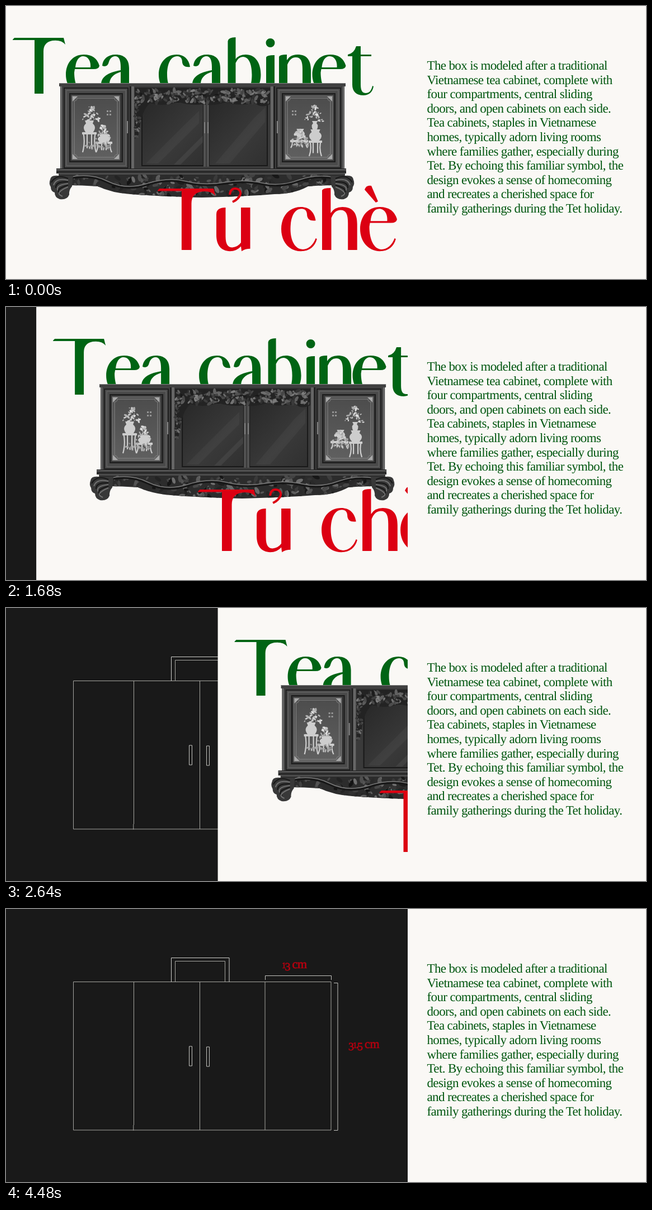
Recreate the animation shown at these times as an HTML page. Size 1144 by 489 pixels, loop 4560 ms.

```html
<!DOCTYPE html>
<html lang="en">
<head>
<meta charset="utf-8">
<title>Tea cabinet</title>
<style>
html, body { margin: 0; width: 100%; height: 100%; overflow: hidden; background: #faf8f5; }
svg { display: block; width: 100vw; height: 100vh; }
text { font-family: "Liberation Serif", "Times New Roman", serif; text-rendering: geometricPrecision; }
.copy { font-size: 23px; letter-spacing: -0.63px; fill: #00560f; }
.size { font-size: 22px; fill: #b4000f; stroke: #b4000f; stroke-width: .7; letter-spacing: -.3px; }
.plan { fill: none; stroke: #a5a5a0; stroke-width: 1; }
</style>
</head>
<body>
<svg id="stage" viewBox="0 0 1144 489" xmlns="http://www.w3.org/2000/svg"></svg>
<script>
const LOOP = 4560, STEP = 80;

// Display letters: baseline at 0, cap height 100
const stemArch = top => `M0,0V${top + 4}Q1,${top} 14,${top}V-60Q20,-70 33,-70C50,-70 57,-60 57,-42V0H42V-44C42,-58 39,-65 30,-65Q20,-65 15,-52V0Z`;
const glyphs = {
  T: "M0,-97L3,-100H91L94,-88Q87,-97 71,-95Q55,-92 55,-76V0H39V-96H0Z",
  e: "M60,-50Q54,-70 32,-70C12,-70 0,-54 0,-34C0,-14 13,2 32,2C46,2 55,-6 58,-18L56,-19C52,-8 44,-1 35,-1C22,-1 15,-18 15,-38L16,-44H50Q59,-44 60,-50ZM17,-47C18,-59 23,-67 31,-67C40,-67 45,-58 44,-47Z",
  a: "M50,0V-46C50,-62 41,-70 26,-70C12,-70 3,-62 2,-50Q10,-47 13,-54C15,-62 19,-67 25,-67C32,-67 35,-60 35,-48V-42C12,-38 0,-30 0,-16C0,-4 8,2 16,2C26,2 33,-4 35,-12V0ZM35,-39C22,-35 15,-28 15,-17C15,-8 19,-4 24,-4C31,-4 35,-12 35,-20Z",
  c: "M56,-48C54,-62 45,-70 32,-70C12,-70 0,-54 0,-34C0,-14 12,2 32,2C46,2 55,-6 58,-18L56,-19C52,-8 44,-1 35,-1C22,-1 15,-16 15,-34C15,-53 21,-67 33,-67C40,-67 42,-62 42,-56C43,-50 47,-47 56,-48Z",
  b: "M0,-94Q1,-101 14,-101V-62Q20,-70 32,-70C50,-70 59,-54 59,-34C59,-12 46,2 30,2Q14,2 0,0ZM14,-55Q19,-66 27,-66C38,-66 43,-52 43,-34C43,-14 37,-2 28,-2Q18,-2 14,-14Z",
  i: "M0,0V-65Q1,-69 15,-69V0ZM-.5,-91a8,8 0 1 0 16,0a8,8 0 1 0 -16,0Z",
  n: stemArch(-70),
  h: stemArch(-101),
  t: "M0,-70Q11,-72 15,-85H23V-70H42V-67H23V-16C23,-4 27,-1 32,-1C38,-1 42,-5 44,-14L46,-13C44,-2 37,3 28,3C15,3 8,-4 8,-16V-67H0Z",
  u: "M0,-58Q0,-69 15,-69V-22C15,-9 19,-4 26,-4Q35,-5 40,-12V-69H55V-2Q47,-2 41,2L40,-6Q33,2 22,2C8,2 0,-8 0,-24Z"
};

const word = (letters, y, scale, color, label) =>
  `<g fill="${color}" fill-rule="evenodd" role="img" aria-label="${label}">` +
  letters.map(([ch, x]) => `<path transform="translate(${x} ${y}) scale(${scale})" d="${glyphs[ch]}"/>`).join("") + "</g>";

const rect = (x, y, w, h, fill, more = "") => `<rect x="${x}" y="${y}" width="${w}" height="${h}" fill="${fill}" ${more}/>`;
const path = (d, fill, more = "") => `<path d="${d}" fill="${fill}" ${more}/>`;
const line = (d, color, width = 1) => path(d, "none", `stroke="${color}" stroke-width="${width}"`);
const mirror = art => `<g transform="translate(702 0) scale(-1 1)">${art}</g>`;

let seed = 7;
const rnd = () => (seed = seed * 16807 % 2147483647) / 2147483647;
const grey = (lo, hi) => { const v = Math.round(lo + (hi - lo) * rnd()); return `rgb(${v},${v},${v})`; };

// Scatter small leaf shapes; place() returns a centre
function leaves(count, place, size, lo, hi) {
  let out = "";
  for (let i = 0; i < count; i++) {
    const [x, y] = place(rnd(), rnd());
    const r = size * (.5 + rnd());
    out += `<ellipse rx="${r.toFixed(1)}" ry="${(r * .5).toFixed(1)}" fill="${grey(lo, hi)}" transform="translate(${x.toFixed(1)} ${y.toFixed(1)}) rotate(${Math.round(rnd() * 180)})"/>`;
  }
  return out;
}

const pearl = "#cdcdcd";
const bloom = (cx, top, w, h) => leaves(45, (u, v) => [cx + (u - .5) * w * (.2 + v), top + v * h], 2.3, 165, 230);
const stand = (cx, y, w, h) => rect(cx - w / 2, y, w, 4, pearl) +
  line(`M${cx - w / 2 + 2},${y}q4,${h / 2} -1,${h}M${cx + w / 2 - 2},${y}q-4,${h / 2} 1,${h}M${cx - 4},${y}v${h * .8}M${cx + 4},${y}v${h * .8}`, pearl, 2.2);
const vase = (cx, y, w, h) => path(`M${cx - w / 3},${y}h${w * 2 / 3}l-2,${h * .25}q${w / 3},${h * .3} 0,${h * .75}h${4 - w * 2 / 3}q${-w / 3},${-h * .45} 0,${-h * .75}z`, pearl);
const seal = x => [0, 5].map(d => rect(x + d, 187, 3, 3, "#969696") + rect(x + d, 193, 3, 3, "#969696")).join("");

const leftInlay = () => bloom(153, 177, 28, 28) + vase(149, 205, 24, 22) + stand(149, 226, 26, 36) +
  bloom(174, 214, 22, 24) + vase(175, 230, 26, 14) + stand(175, 243, 30, 19) +
  leaves(30, (u, v) => [142 + u * 46, 242 + v * 14], 2.2, 120, 205) + seal(180);

const rightInlay = () => bloom(551, 178, 34, 30) + vase(552, 206, 15, 16) + vase(553, 221, 26, 20) + stand(553, 241, 24, 28) +
  vase(526, 220, 20, 15) + bloom(524, 222, 26, 18) + stand(524, 240, 32, 14) +
  leaves(30, (u, v) => [511 + u * 30, 236 + v * 16], 2.2, 120, 205) + seal(511);

const side = rect(97, 142, 132, 152, "#404040") + line("M99,143V294", "#707070", 2) +
  rect(104, 147, 114, 143, "#4a4a4a", 'stroke="#1e1e1e" stroke-width="2"') +
  rect(108, 151, 106, 135, "none", 'stroke="#6c6c6c"') +
  rect(114, 157, 94, 122, "#363636", 'stroke="#1d1d1d" stroke-width="2"') +
  rect(118, 161, 85, 114, "url(#door)", 'stroke="#858585"') +
  line("M122,174v-4q5,0 5,-5h67q0,5 5,5v96q-5,0 -5,5h-67q0,-5 -5,-5z", "#858585") +
  path("M119,162h9l-9,9zM202,162h-9l9,9zM119,274h9l-9,-9zM202,274h-9l9,-9z", "#a9a9a9") +
  rect(221, 142, 3, 150, "#202020") + rect(224, 142, 5, 150, "#666") +
  line("M217,206v22", "#8b8b8b", 2);

function apron() {
  const foot = [0, 1, 2, 3, 4, 5].map(i =>
    line(`M111,${309 + i * 3}Q${90 - i},${300 + i * 7} ${81 + i * 4},${316 + i * 5}`, i % 2 ? "#707070" : "#171717", 2)).join("");
  const claw = path("M94,304Q80,302 79,311Q76,318 80,324Q80,332 87,334Q87,343 96,346Q109,348 113,338Q112,330 118,323L120,304Z", "#383838") + foot;
  return `<g clip-path="url(#carving)">` + rect(90, 300, 520, 50, "#2c2c2c") +
    leaves(270, (u, v) => [112 + u * 476, 304 + v * 38], 5, 20, 112) +
    line("M112,309Q150,300 182,316T252,320T322,316T390,318T458,319T522,314T590,309", "#171717", 4) +
    line("M112,307Q150,298 182,314T252,318T322,314T390,316T458,317T522,312T590,307", "#7c7c7c", 1.5) +
    "</g>" + claw + `<g transform="translate(700 0) scale(-1 1)">${claw}</g>`;
}

function cabinet() {
  return rect(97, 140, 508, 156, "#303030") + side + mirror(side) + leftInlay() + rightInlay() +
    rect(229, 144, 244, 148, "#3a3a3a") +
    rect(243, 172, 110, 114, "url(#glass)", 'stroke="#191919" stroke-width="2"') +
    rect(363, 172, 104, 114, "url(#glass)", 'stroke="#191919" stroke-width="2"') +
    path("M322,210L345,188V210L272,282H250ZM444,200L463,182V208L400,282H374Z", "#fff", 'opacity=".035"') +
    path("M352,232V244L312,284H300Z", "#fff", 'opacity=".06"') +
    rect(353, 176, 10, 112, "#525252") + line("M358,176V288", "#202020") + line("M355,208v20M361,208v20", "#a0a0a0") +
    path("M230,146H472V176Q456,184 445,174Q410,180 395,172Q370,180 352,176Q330,179 308,172Q280,181 258,174Q243,184 238,224Q234,236 230,238Z", "#232323") +
    leaves(240, (u, v) => [233 + u * 236, 150 + v * 23], 4, 25, 130) +
    leaves(36, (u, v) => [231 + u * 8, 172 + v * 62], 3, 28, 115) +
    rect(95, 138, 512, 6, "#404040") + line("M95,138.5H607", "#858585") +
    rect(90, 291, 518, 9, "#2b2b2b") + line("M90,293.5H608", "#747474", 1.5) +
    rect(94, 299, 512, 5, "#4c4c4c") + apron();
}

const plan = `<g class="plan">
  <path d="M120.5,130.5H581V396H120.5ZM228.5,130V387M227.8,387V397M346.5,130V396M463,130V396"/>
  <path stroke="#d0d0cc" d="M295.5,130.5V87.5H399V130.5"/>
  <path d="M302.5,130V93.5H391.5V130"/>
  <path stroke="#c4c4c0" d="M327.5,246h5v35h-5ZM358.5,247h5v35h-5ZM463.5,127V119.5H581.5V127M586,132.5H593V396.5H586"/>
</g>
<text class="size" y="106"><tspan x="493" font-size="15">1</tspan><tspan x="498.5" dy="4" font-size="20">3</tspan><tspan x="511.5" dy="-4">cm</tspan></text>
<text class="size" y="249"><tspan x="612" dy="4" font-size="20">3</tspan><tspan x="620" dy="-4" font-size="15">1</tspan><tspan x="625.5">.</tspan><tspan x="628" dy="4" font-size="20">5</tspan><tspan x="641" dy="-4">cm</tspan></text>`;

const copy = [
  "The box is modeled after a traditional", "Vietnamese tea cabinet, complete with",
  "four compartments, central sliding", "doors, and open cabinets on each side.",
  "Tea cabinets, staples in Vietnamese", "homes, typically adorn living rooms",
  "where families gather, especially during", "Tet. By echoing this familiar symbol, the",
  "design evokes a sense of homecoming", "and recreates a cherished space for",
  "family gatherings during the Tet holiday."
].map((s, i) => `<text class="copy" x="752.5" y="${(114 + i * 25.6).toFixed(1)}">${s}</text>`).join("");

const green = [["T", 12], ["e", 107], ["a", 170], ["c", 273], ["a", 333], ["b", 396.5], ["i", 465], ["n", 488], ["e", 547.5], ["t", 611]];
const red = [["T", 271], ["u", 376], ["c", 492], ["h", 565], ["e", 633]];
const marks = line("M400,338Q401,327 410,327Q420,328 419,337Q416,346 405,351", "#dc0012", 4) +
  path("M641,329Q644,320 653,322L665,350L661,352Z", "#dc0012");

const stage = document.getElementById("stage");
stage.innerHTML = `<defs>
  <clipPath id="view"><rect width="718" height="489"/></clipPath>
  <clipPath id="carving"><path d="M94,302H606L588,321Q560,321 540,323Q515,337 480,337Q430,341 350,343Q270,341 222,337Q190,335 164,323Q135,321 110,321Z"/></clipPath>
  <linearGradient id="glass" x1="0" y1="0" x2="1" y2="1"><stop offset="0" stop-color="#282828"/><stop offset=".6" stop-color="#393939"/><stop offset="1" stop-color="#303030"/></linearGradient>
  <linearGradient id="door" x1="0" y1="0" x2="0" y2="1"><stop offset="0" stop-color="#4c4c4c"/><stop offset="1" stop-color="#606060"/></linearGradient>
</defs>
${rect(0, 0, 1144, 489, "#faf8f5")}
<g clip-path="url(#view)">
  ${rect(0, 0, 718, 489, "#191919")}${plan}
  <g id="sheet">${rect(-18, 0, 740, 489, "#faf8f5")}
    ${word(green, 157, 1, "#006414", "Tea cabinet")}
    ${cabinet()}
    ${word(red, 437, 1.1, "#dc0012", "Tủ chè")}${marks}
  </g>
</g>${copy}`;

const sheet = document.getElementById("sheet");

// The sheet slides at constant speed, sampled from 30 steps per second
function draw(ms) {
  const tick = Math.round(Math.floor(ms / STEP) * STEP * .03);
  const shift = Math.min(736, Math.max(0, (tick - 43.56) * 11.19));
  sheet.setAttribute("transform", `translate(${shift.toFixed(1)} 0)`);
}

const start = performance.now();
function loop() {
  draw((performance.now() - start) % LOOP);
  requestAnimationFrame(loop);
}
loop();
</script>
</body>
</html>
```
